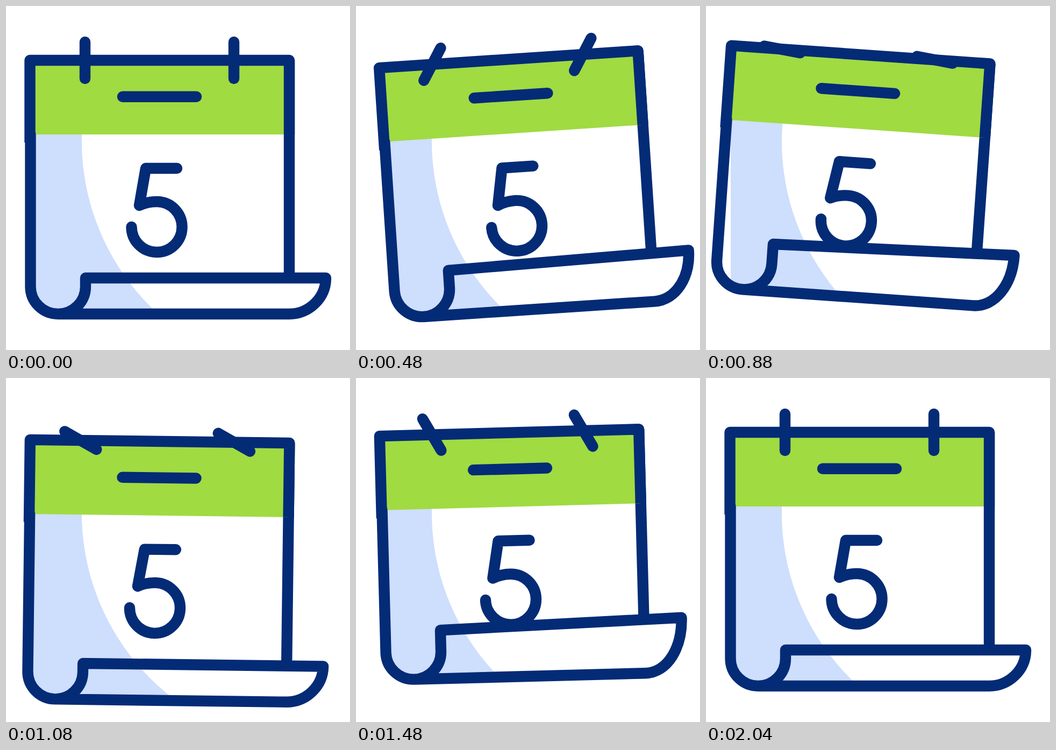
Recreate the animation shown at these times as an HTML page. Size 640x640 px, loop 3 s.

```html
<!DOCTYPE html>
<html lang="en">
<head>
<meta charset="utf-8">
<title>Swinging calendar</title>
<style>
  html, body { margin: 0; width: 100%; height: 100%; overflow: hidden; background: #fff; }
  svg { display: block; width: 100vw; height: 100vh; }
  .ink { fill: none; stroke: #042b76; stroke-width: 20.4; stroke-linejoin: round; }
  .round { stroke-linecap: round; }
</style>
</head>
<body>
<svg viewBox="0 0 640 640">
  <clipPath id="paper">
    <path id="clipSheet" />
    <path id="clipFold" />
  </clipPath>

  <g class="page">
    <path id="rightEdge" class="ink" />
    <path class="ink round" d="M318 302H260L248 371Q263 364 281 364A47 47 0 1 1 233.5 411" />
    <path id="fold" fill="#fff" />
  </g>

  <g clip-path="url(#paper)">
    <path fill="#cedefd" d="M46 90H172A435 435 0 0 0 342 618V640H46Z" />
  </g>

  <g class="page">
    <path fill="#a0db42" d="M45 101H527V239H45Z" />
    <path class="ink" d="M44.5 254V101H527V239" />
    <path id="outline" class="ink round" />
    <path class="ink round" d="M217 168.7H354" />
  </g>
  <path id="ringLeft" class="ink round" d="M0 -34V34" />
  <path id="ringRight" class="ink round" d="M0 -34V34" />
</svg>
<script>
const LOOP = 3000, STEP = 40;
const PIVOT = { x: 286, y: 130 };
const BOUNCE = [0, 320, 700, 1060, 1540, 2040];
const SWING = [0, 470, 900, 1240, 1950];
const RING = [0, 320, 620, 900, 1280, 1720, 2040];
const byId = id => document.getElementById(id);
const pages = document.querySelectorAll('.page');

// Sine easing from one turning point to the next.
function sway(t, times, values) {
  const i = times.findIndex(time => time > t);
  if (i < 0) return values[values.length - 1];
  if (i === 0) return values[0];
  const u = (t - times[i - 1]) / (times[i] - times[i - 1]);
  return values[i - 1] + (values[i] - values[i - 1]) * (1 - Math.cos(Math.PI * u)) / 2;
}

function placeRing(el, x, drop, tilt, turn, slip) {
  const a = tilt * Math.PI / 180, rx = x - PIVOT.x, ry = 101 - PIVOT.y;
  const cx = PIVOT.x + rx * Math.cos(a) - ry * Math.sin(a) + slip;
  const cy = PIVOT.y + rx * Math.sin(a) + ry * Math.cos(a) + drop;
  el.setAttribute('transform', `translate(${cx} ${cy}) rotate(${turn})`);
}

function draw(t) {
  const drop = sway(t, BOUNCE, [0, 20, -38, 17, 0, 0]);
  const stretch = sway(t, BOUNCE, [0, 24, -52, 10, -19, 0]);
  const lift = sway(t, BOUNCE, [0, 0, 42, 0, 24, 0]);
  const tilt = sway(t, SWING, [0, -3.8, 4.05, -2.05, 0]);
  const turn = sway(t, RING, [0, -20.3, 66, -81, -36, -23.5, 0]);
  const slip = sway(t, [320, 640, 1280, 1720], [0, -7, -9, 0]);

  const bottom = 573 + stretch, curl = bottom - 51;
  const left = 506 + stretch - lift;
  const right = 506 + stretch - lift * 1.5;
  const tip = 595 + lift * .09;
  const edge = left + (right - left) * (527 - 148) / (tip - 148);
  const bend = (bottom - right) * .55;

  const curlLeft = `V${curl}A51.5 51 0 0 0 97 ${bottom}`;
  const curlRight = `A51 51 0 0 0 148 ${curl}V${left}`;
  const flap = `L${tip} ${right}C${tip} ${right + bend} ${564 + lift * .2} ${bottom} 527 ${bottom}H97`;
  const sheet = `M45.5 101${curlLeft}${curlRight}L527 ${edge}V101Z`;
  const fold = `M97 ${bottom}${curlRight}${flap}Z`;
  const move = `translate(0 ${drop}) rotate(${tilt} ${PIVOT.x} ${PIVOT.y})`;

  pages.forEach(g => g.setAttribute('transform', move));
  byId('rightEdge').setAttribute('d', `M527 101V${edge}`);
  byId('fold').setAttribute('d', fold);
  byId('outline').setAttribute('d', `M45.5 239${curlLeft}${curlRight}${flap}`);
  for (const [id, d] of [['clipSheet', sheet], ['clipFold', fold]]) {
    byId(id).setAttribute('d', d);
    byId(id).setAttribute('transform', move);
  }
  placeRing(byId('ringLeft'), 147, drop, tilt, turn, slip);
  placeRing(byId('ringRight'), 424, drop, tilt, turn, 0);
}

const start = performance.now();
function tick() {
  const t = (performance.now() - start) % LOOP;
  draw(Math.floor(t / STEP) * STEP);
  requestAnimationFrame(tick);
}
tick();
</script>
</body>
</html>
```
